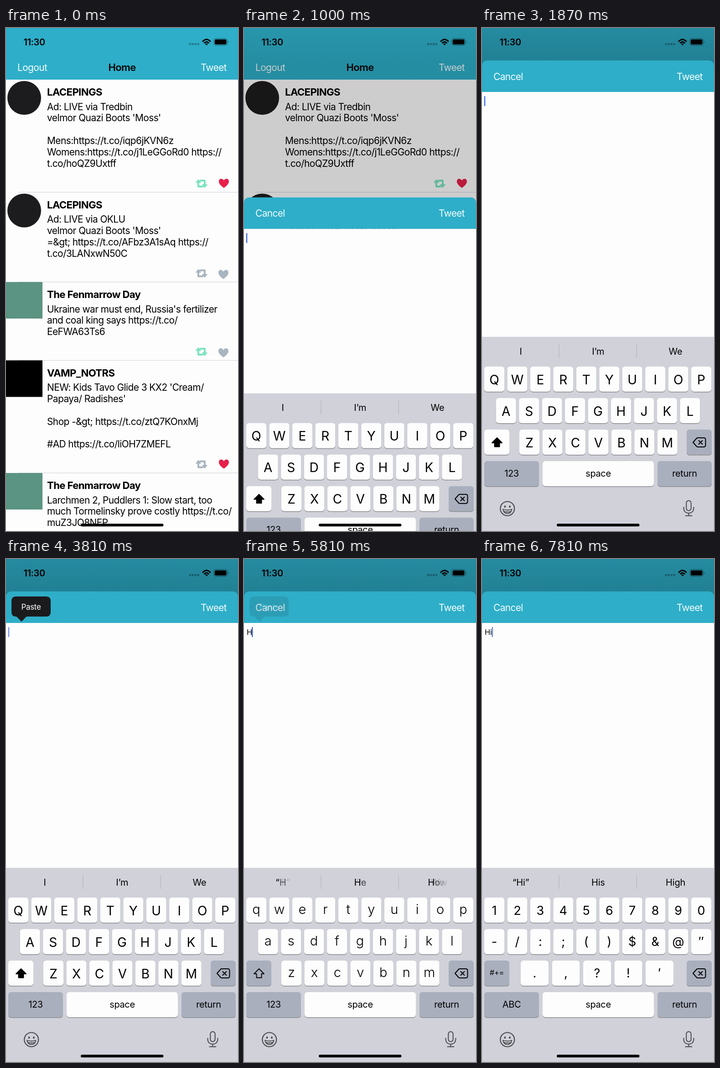
Animation, 509 px wide and 1101 px high, one loop 8 s. Source, as an HTML page:

```html
<!DOCTYPE html>
<html lang="en">
<head>
<meta charset="utf-8">
<title>Home feed</title>
<style>
  html, body { margin: 0; width: 100%; height: 100%; overflow: hidden; background: #fdfdfd; }
  svg { display: block; width: 100vw; height: 100vh; }
  text { font: 20.9px Inter, "Liberation Sans", sans-serif; letter-spacing: -.027em; white-space: pre; }
  .mid { text-anchor: middle; }
  .end { text-anchor: end; }
  .name { font-size: 22.2px; font-weight: 700; letter-spacing: -.03em; }
  .title { font-size: 22px; font-weight: 600; }
  .time { font-size: 20px; font-weight: 600; letter-spacing: -.02em; }
  .nav { fill: #f4fcfd; letter-spacing: -.03em; }
  .small { font-size: 16.3px; letter-spacing: -.01em; }
  .menu { font-size: 17px; fill: #fff; letter-spacing: -.02em; }
  .word { font-size: 20px; letter-spacing: -.01em; }
  .upper { font-size: 28px; letter-spacing: 0; }
  .lower { font-size: 29px; font-weight: 300; letter-spacing: 0; }
  .symbol { font-size: 27px; letter-spacing: 0; }
  .label { font-size: 20px; letter-spacing: -.02em; }
</style>
</head>
<body>
<svg id="stage" viewBox="0 0 509 1101" preserveAspectRatio="none"></svg>
<script>
const LOOP = 8000;
const TEAL = '#2eaec8', WHITE = '#fdfdfd', GREY = '#a9b5c0', GREEN = '#7ce3bd', RED = '#e61f4b';
const KEY_GREY = '#a9afbd';
const OPEN_AT = 860, MENU_IN = 2400, MENU_OUT = 5650, TYPE_H = 5690, TYPE_I = 6270, SYMBOLS = 7620;

const esc = s => s.replace(/&/g, '&amp;').replace(/</g, '&lt;');
const text = (x, y, s, cls = '', more = '') =>
  `<text x="${x}" y="${y}" class="${cls}" ${more}>${esc(s)}</text>`;
const rect = (x, y, w, h, fill, r = 0, more = '') =>
  `<rect x="${x}" y="${y}" width="${w}" height="${h}" rx="${r}" fill="${fill}" ${more}/>`;
const path = (d, more) => `<path d="${d}" ${more}/>`;
const line = (d, color, w = 2) => path(d, `fill="none" stroke="${color}" stroke-width="${w}" stroke-linecap="round" stroke-linejoin="round"`);
const group = (id, body, more = '') => `<g id="${id}" ${more}>${body}</g>`;

// Feed
const disc = y => `<circle cx="40" cy="${y + 40}" r="37" fill="#1c1c1e"/>`;
const square = fill => y => rect(0, y, 80, 80, fill);
const paper = square('#5b9482');
const feed = [
  { top: 113, end: 359.5, icon: disc, name: 'LACEPINGS', share: GREEN, like: RED, lines: [
    'Ad: LIVE via Tredbin', "velmor Quazi Boots 'Moss'", '', 'Mens:https://t.co/iqp6jKVN6z',
    'Womens:https://t.co/j1LeGGoRd0 https://', 't.co/hoQZ9Uxtff'] },
  { top: 359.5, end: 556, icon: disc, name: 'LACEPINGS', share: GREY, like: GREY, lines: [
    'Ad: LIVE via OKLU', "velmor Quazi Boots 'Moss'", '=&gt; https://t.co/AFbz3A1sAq https://', 't.co/3LANxwN50C'] },
  { top: 556, end: 727.5, icon: paper, name: 'The Fenmarrow Day', share: GREEN, like: GREY, lines: [
    "Ukraine war must end, Russia's fertilizer", 'and coal king says https://t.co/', 'EeFWA63Ts6'] },
  { top: 727.5, end: 974, icon: square('#000'), name: 'VAMP_NOTRS', share: GREY, like: RED, lines: [
    "NEW: Kids Tavo Glide 3 KX2 'Cream/", "Papaya/ Radishes'", '', 'Shop -&gt; https://t.co/ztQ7KOnxMj', '',
    '#AD https://t.co/liOH7ZMEFL'] },
  { top: 974, end: 1145, icon: paper, name: 'The Fenmarrow Day', share: GREY, like: GREY, lines: [
    'Larchmen 2, Puddlers 1: Slow start, too', 'much Tormelinsky prove costly https://t.co/', 'muZ3JQ8NEP'] },
];

function shareIcon(x, y, color) {
  const arrow = path('M-12.5-2L-7-9L-1.5-2Z', `fill="${color}" stroke="${color}" stroke-linejoin="round"`) +
    line('M-7-3V6.5H2.5', color, 4);
  return `<g transform="translate(${x} ${y})">${arrow}<g transform="rotate(180)">${arrow}</g></g>`;
}
const heart = (x, y, color) =>
  path('M0 10C-4 7-11 2-11-4C-11-11-3-12 0-6C3-12 11-11 11-4C11 2 4 7 0 10Z',
    `fill="${color}" transform="translate(${x} ${y})"`);

function row({ top, end, icon, name, share, like, lines }) {
  const liked = like === RED;
  return icon(top) + text(90, top + 35, name, 'name') +
    lines.map((s, i) => s && text(90, top + 66.5 + i * 24.85, s)).join('') +
    shareIcon(429, end - 19, share) + heart(liked ? 478 : 477, end - (liked ? 19.5 : 16.5), like) +
    rect(26, end - .5, 483, 1, '#cfd0dc');
}

const home = feed.map(row).join('') + rect(0, 0, 509, 113, TEAL) +
  text(25, 94, 'Logout', 'nav') + text(254.5, 94, 'Home', 'title mid') +
  text(484, 94, 'Tweet', 'nav end', 'id="tap"');

const status = text(38.5, 37.8, '11:30', 'time') +
  [0, 1, 2, 3].map(i => rect(401.5 + i * 6, 33, 4.5, 4.5, '#000', 1, 'opacity=".28"')).join('') +
  line('M432 29Q440 21 448 29', '#000', 3) + line('M435.5 32.5Q440 28.5 444.5 32.5', '#000', 3) +
  path('M437 35Q440 32.5 443 35L440 38Z', '') +
  rect(456.2, 23.2, 29, 14.6, 'none', 4.5, 'stroke="#000" stroke-opacity=".45" stroke-width="1.2"') +
  rect(458, 25, 25.4, 11, '#000', 2.8) + path('M487 28Q489.4 30.5 487 33Z', 'opacity=".5"');

// Compose sheet
const sheet = path('M0 13Q0 0 13 0H496Q509 0 509 13V69H0Z', `fill="${TEAL}"`) +
  rect(0, 69, 509, 1032, WHITE) +
  text(25, 42.5, 'Cancel', 'nav') + text(484, 42.5, 'Tweet', 'nav end') +
  text(6, 95, '', 'small', 'id="typed"') + rect(0, 78, 2.4, 22, '#3a66ee', 1, 'id="caret"') +
  group('menu', path('M22 11H88Q98 11 98 21V45Q98 55 88 55H45L34 66L23 55H22Q12 55 12 45V21Q12 11 22 11Z', 'fill="#1b1b1d"') +
    text(55, 40, 'Paste', 'menu mid'));

// Keyboard, drawn from its own top edge
const key = (x, y, w, fill = WHITE) => rect(x, y + 1.5, w, 55, '#898b90', 6) + rect(x, y, w, 55, fill, 6);
const keyRow = (chars, x, y, cls, dy, step = 50.45, w = 44) => [...chars].map((c, i) =>
  key(x + i * step, y, w) + text(x + i * step + w / 2, y + dy, c, cls + ' mid')).join('');
const wide = (x, w, s, fill, y = 272) => key(x, y, w, fill) + text(x + w / 2, y + 33.5, s, 'label mid');
const arrow = more => path('M33 221L44 232H38.5V240.5H27.5V232H22Z',
  `stroke="#000" stroke-width="1.8" stroke-linejoin="round" ${more}`);

const letters = (rows, cls, dy, shift) =>
  keyRow(rows[0], 5, 65, cls, dy) + keyRow(rows[1], 30.7, 134, cls, dy) +
  keyRow(rows[2], 82, 203, cls, dy) + shift + wide(5, 120, '123', KEY_GREY);
const rows = ['QWERTYUIOP', 'ASDFGHJKL', 'ZXCVBNM'];
const layouts = [
  letters(rows, 'upper', 38.5, key(5, 203, 55) + arrow('')),
  letters(rows.map(r => r.toLowerCase()), 'lower', 35.5, key(5, 203, 55, KEY_GREY) + arrow('fill="none"')),
  keyRow('1234567890', 5, 65, 'symbol', 38) + keyRow('-/:;()$&@″', 5, 134, 'symbol', 37) +
    keyRow('.,?!′', 85, 203, 'symbol', 37, 68.5, 61) +
    key(5, 203, 55, KEY_GREY) + text(32.5, 234.5, '#+=', 'small mid') + wide(5, 120, 'ABC', KEY_GREY),
];

const hints = [
  { from: -1000, to: TYPE_H, words: ['I', 'I’m', 'We'] },
  { from: TYPE_H, to: TYPE_I, words: ['“H”', 'He', 'How'] },
  { from: TYPE_I, to: LOOP + 1000, words: ['“Hi”', 'His', 'High'] },
];
const hint = (s, i) => `<text x="${85 + i * 169.8}" y="38.5" class="word mid">` +
  [...s].map((c, n) => `<tspan data-n="${n}">${c}</tspan>`).join('') + '</text>';

const INK = '#484a4e';
const keyboard = rect(0, 0, 509, 430, '#cbcdd5', 0, 'opacity=".9"') +
  rect(168.5, 16, 1.2, 30, '#b5b7bd') + rect(338.5, 16, 1.2, 30, '#b5b7bd') +
  hints.map(h => `<g class="hints">${h.words.map(hint).join('')}</g>`).join('') +
  layouts.map(l => `<g class="layout">${l}</g>`).join('') +
  key(449, 203, 55, KEY_GREY) + line('M463 231L471 222Q472 221 473.5 221H486.5Q490.5 221 490.5 225V237Q490.5 241 486.5 241H473.5Q472 241 471 240ZM475.5 227L483.5 235M483.5 227L475.5 235', '#000') +
  wide(133, 244, 'space') + wide(385, 119, 'return', KEY_GREY) +
  `<circle cx="55.7" cy="376" r="15.5" fill="none" stroke="${INK}" stroke-width="2.2"/>` +
  `<ellipse cx="50.5" cy="371.5" rx="1.8" ry="2.5" fill="${INK}"/><ellipse cx="61" cy="371.5" rx="1.8" ry="2.5" fill="${INK}"/>` +
  line('M46 377.5Q55.7 381 65.4 377.5Q64 386.5 55.7 386.5Q47.5 386.5 46 377.5ZM48 382Q55.7 384.5 63.5 382', INK, 1.8) +
  rect(448.3, 358.5, 10.4, 22, 'none', 5.2, `stroke="${INK}" stroke-width="2"`) +
  line('M442.5 373V376Q443.5 385.5 453.5 386Q463.5 385.5 464.5 376V373M453.5 386V391.5M446.5 391.5H460.5', INK);

const stage = document.getElementById('stage');
stage.innerHTML = `<defs><linearGradient id="shade" gradientUnits="userSpaceOnUse" x1="0" y1="0" x2="0" y2="80">
    <stop offset="0" stop-opacity=".2"/><stop offset="1" stop-opacity=".27"/></linearGradient></defs>` +
  rect(0, 0, 509, 1101, WHITE) + group('home', home) +
  rect(0, 0, 509, 1101, 'url(#shade)', 0, 'id="dim"') + status +
  group('sheet', sheet) + group('keyboard', keyboard) + rect(164, 1085, 181.5, 6, '#000', 3);

const el = id => document.getElementById(id);
const attr = (node, name, value) => node.setAttribute(name, value);
const ramp = (t, from, length) => Math.min(1, Math.max(0, (t - from) / length));
const layoutNodes = stage.querySelectorAll('.layout');
const hintNodes = [...stage.querySelectorAll('.hints')].map(g => g.querySelectorAll('tspan'));

// One-second blink: fade out, short pause, fade in, stay on
function caretAlpha(t) {
  if (t < 2200 || (t >= TYPE_H && t < TYPE_I + 500)) return 1;
  const u = (t - (t < TYPE_H ? 250 : 770) + 1000) % 1000;
  return Math.max(1 - ramp(u, 0, 200), ramp(u, 420, 200));
}

function draw(t) {
  const x = Math.max(0, t - OPEN_AT) * .0176;
  const away = (1 + x) * Math.exp(-x);
  attr(el('sheet'), 'transform', `translate(0 ${71 + 1030 * away})`);
  attr(el('keyboard'), 'transform', `translate(0 ${676 + 425 * away})`);
  attr(el('dim'), 'opacity', 1 - away);
  attr(el('tap'), 'opacity', 1 - .7 * (ramp(t, 500, 60) - ramp(t, 640, 280)));
  attr(el('menu'), 'opacity', ramp(t, MENU_IN, 180) - ramp(t, MENU_OUT, 180));

  const count = (t >= TYPE_H) + (t >= TYPE_I);
  el('typed').textContent = 'Hi'.slice(0, count);
  attr(el('caret'), 'x', [4.8, 17, 21.6][count]);
  attr(el('caret'), 'opacity', caretAlpha(t));

  const mode = (t >= TYPE_H) + (t >= SYMBOLS);
  layoutNodes.forEach((g, i) => attr(g, 'display', i === mode ? 'inline' : 'none'));
  hints.forEach((h, i) => hintNodes[i].forEach(c =>
    attr(c, 'fill-opacity', ramp(t, h.from + c.dataset.n * 50, 120) * (1 - ramp(t, h.to, 150)))));
}

const start = performance.now();
function tick() {
  draw((performance.now() - start) % LOOP);
  requestAnimationFrame(tick);
}
tick();
</script>
</body>
</html>
```
